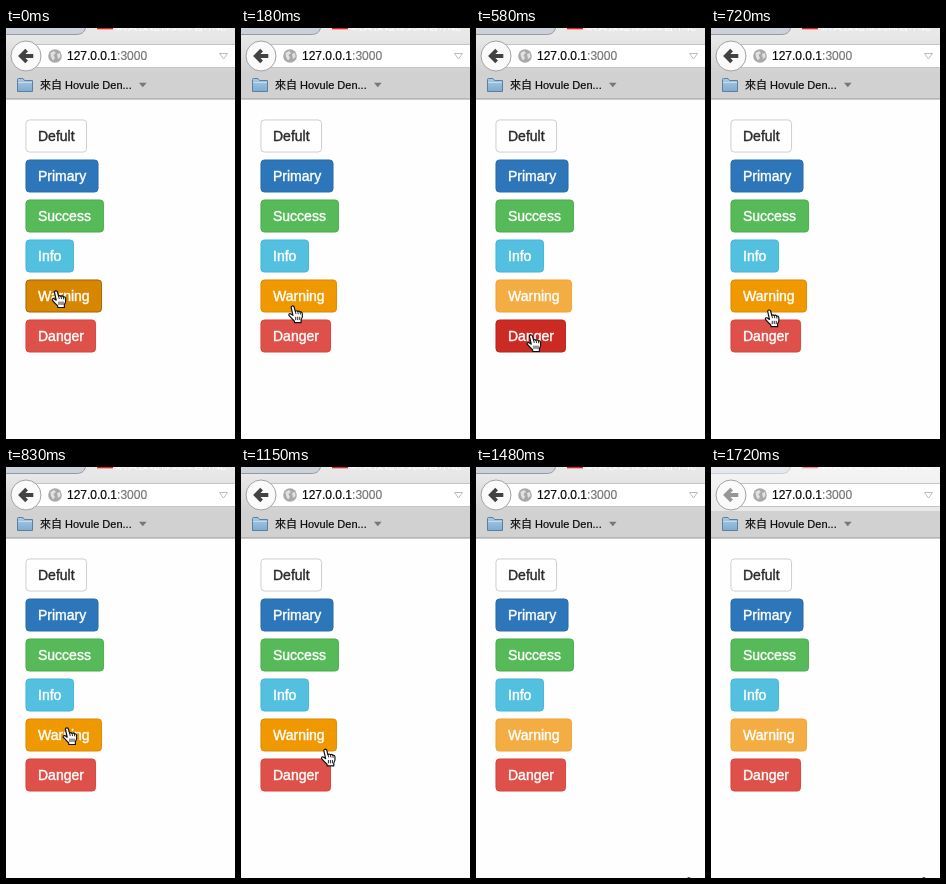
Write an HTML page that moves like this. It is 229 px wide and 411 px high and loops after 1.82 s.

```html
<!DOCTYPE html>
<html lang="en">
<head>
<meta charset="utf-8">
<title>Button states</title>
<style>
  html, body { margin: 0; width: 100%; height: 100%; overflow: hidden; background: #fefefe; }
  svg { display: block; width: 100%; height: 100%; }
  text { font-family: "Liberation Sans", Arial, "Noto Sans CJK TC", "Noto Sans CJK", sans-serif; }
  .label { font-size: 14px; stroke-width: .4; }
  .chrome { fill: #0a0a0a; stroke: #0a0a0a; stroke-width: .2; }
</style>
</head>
<body>
<svg viewBox="0 0 229 411">
  <defs>
    <linearGradient id="bar" x1="0" y1="0" x2="0" y2="1">
      <stop offset="0" stop-color="#e8e8e8"/><stop offset="1" stop-color="#d2d2d2"/>
    </linearGradient>
    <linearGradient id="folder" x1="0" y1="0" x2="0" y2="1">
      <stop offset="0" stop-color="#a9c9e2"/><stop offset="1" stop-color="#7fabd0"/>
    </linearGradient>
  </defs>
  <rect width="229" height="411" fill="#fefefe"/>

  <!-- tab strip and address bar -->
  <rect width="229" height="8" fill="#e8e8e8"/>
  <path d="M0 0H79.5C78 5 75 6.5 70 6.5H0Z" fill="#ccd1d9"/>
  <path d="M79.5 0C78 5 75 6.5 70 6.5H0" fill="none" stroke="#969ba3"/>
  <rect x="91" width="16" height="1.3" fill="#e0201c"/>
  <text x="110" y="1.5" font-size="11" fill="#fff">網頁按鈕樣式練習示範</text>
  <rect y="8" width="229" height="36" fill="url(#bar)"/>
  <rect id="fade" width="229" height="44" fill="#fff"/>
  <path d="M30 16.5H230V39.5H30Z" fill="#fff" stroke="#c4c4c4"/>
  <circle cx="20" cy="28" r="15" fill="#fafafa" stroke="#a2a2a2"/>
  <path id="arrow" d="M27.3 28H15M20.6 22.2L14.8 28L20.6 33.8" fill="none" stroke-width="3.8"/>
  <circle cx="49" cy="28" r="6.8" fill="#a9a9a9"/>
  <path d="M44.5 25L48 23L50 25L47.5 27L49 30L47 32.5L45 29ZM51 26L54 25L54.5 29L52 31Z" fill="#e2e2e2"/>
  <text x="61" y="32" font-size="12" class="chrome">127.0.0.1<tspan fill="#777" stroke="#777">:3000</tspan></text>
  <path d="M213.5 25.5H221.5L217.5 31Z" fill="#fff" stroke="#bcbcbc"/>

  <!-- bookmarks bar -->
  <rect y="44" width="229" height="27" fill="#d1d1d1"/>
  <rect y="70.5" width="229" height="1" fill="#999"/>
  <path d="M11.5 63.5V51.5Q11.5 50.5 12.5 50.5H17L18.5 52.5H26.5V63.5Z" fill="url(#folder)" stroke="#5a7f9f"/>
  <path d="M12 54.5H26" stroke="#c4dcee"/>
  <text x="34" y="61" font-size="11" class="chrome">來自 Hovule Den...</text>
  <path d="M133 54.8H140.6L136.8 59.2Z" fill="#777"/>

  <g id="buttons"></g>
  <g id="hand" stroke="#111" stroke-linejoin="round" stroke-linecap="round">
    <path fill="#fff" stroke-width="1.2" d="M-1.6 1Q-.8 -1 1.2 .3L2.6 5.2Q3.6 4 5 5.3Q6.4 4.4 7.4 5.9Q9.2 5.5 9.6 7.4Q10.2 11 8.4 13.6V16.5H1.8L1.6 14.8Q-1 12.5 -3.8 9.2Q-4.2 7.2 -2.2 7.6L.2 9.2Z"/>
    <path fill="none" stroke-width=".9" d="M2.6 5.2L3.2 7.6M5 5.3L5.5 7.7M7.4 5.9L7.7 8M3 11V13.5M5 11V13.5M7 11V13.5"/>
  </g>
</svg>
<script>
const LOOP = 1820;
const LEFT = 19.5, TOP = 91.5, HEIGHT = 33, LINE = .9;
const NS = "http://www.w3.org/2000/svg";
const $ = id => document.getElementById(id);

function add(parent, tag, attrs) {
  const el = document.createElementNS(NS, tag);
  for (const k in attrs) el.setAttribute(k, attrs[k]);
  return parent.appendChild(el);
}

// Each state is [fill, border].
const styles = [
  { name: "Defult", w: 61.5, ink: "#2b2b2b", idle: ["#fff", "#c9c9c9"] },
  { name: "Primary", w: 73, idle: ["#2d76b9", "#286aa6"] },
  { name: "Success", w: 78.5, idle: ["#55ba57", "#46aa48"] },
  { name: "Info", w: 48.5, idle: ["#54c0e0", "#3bb4d8"] },
  { name: "Warning", w: 76.5, idle: ["#f4ad42", "#f0a02e"],
    hover: ["#ef9800", "#d68600"], active: ["#d68600", "#985f00"] },
  { name: "Danger", w: 70.5, idle: ["#de514a", "#d73e37"],
    hover: ["#cc2b24", "#ae241e"], active: ["#ae241e", "#771712"] }
];

const buttons = styles.map((s, i) => {
  const y = TOP + 40 * i;
  const rect = add($("buttons"), "rect", {
    x: LEFT + LINE / 2, y: y + LINE / 2, width: s.w - LINE, height: HEIGHT - LINE,
    rx: 3.5, "stroke-width": LINE
  });
  const ink = s.ink || "#fff";
  add($("buttons"), "text", { x: 32, y: y + 21.5, class: "label", fill: ink, stroke: ink }).textContent = s.name;
  return { ...s, y, rect };
});

const smooth = u => u * u * (3 - 2 * u);
const speedUp = u => u * u;
const linear = u => u;

// Pointer moves: start, end, target tip, easing.
const start = [50, 263];
const moves = [
  [110, 290, [55, 307], smooth],
  [600, 830, [61, 261], smooth],
  [1010, 1150, [84, 282], speedUp],
  [1150, 1480, [213, 411], linear]
];

function tipAt(t) {
  let p = start;
  for (const [from, to, target, ease] of moves) {
    if (t < from) break;
    const u = ease(Math.min(1, (t - from) / (to - from)));
    p = p.map((v, i) => v + (target[i] - v) * u);
  }
  return p;
}

const isPressed = t => t < 90 || (t >= 470 && t < 580);

function draw(t) {
  const [x, y] = tipAt(t);
  $("hand").setAttribute("transform", `translate(${x} ${y})`);

  for (const b of buttons) {
    const over = x >= LEFT && x < LEFT + b.w && y >= b.y && y < b.y + HEIGHT;
    const state = !over ? "idle" : isPressed(t) ? "active" : "hover";
    const [fill, border] = b[state] || b.idle;
    b.rect.setAttribute("fill", fill);
    b.rect.setAttribute("stroke", border);
  }

  // The window loses focus in two steps.
  const blur = t < 1690 ? 0 : t < 1720 ? .5 : 1;
  const grey = 66 + 84 * blur;
  $("fade").setAttribute("opacity", .5 * blur);
  $("arrow").setAttribute("stroke", `rgb(${grey},${grey},${grey})`);
}

const origin = performance.now();
function tick() {
  draw((performance.now() - origin) % LOOP);
  requestAnimationFrame(tick);
}
tick();
</script>
</body>
</html>
```
